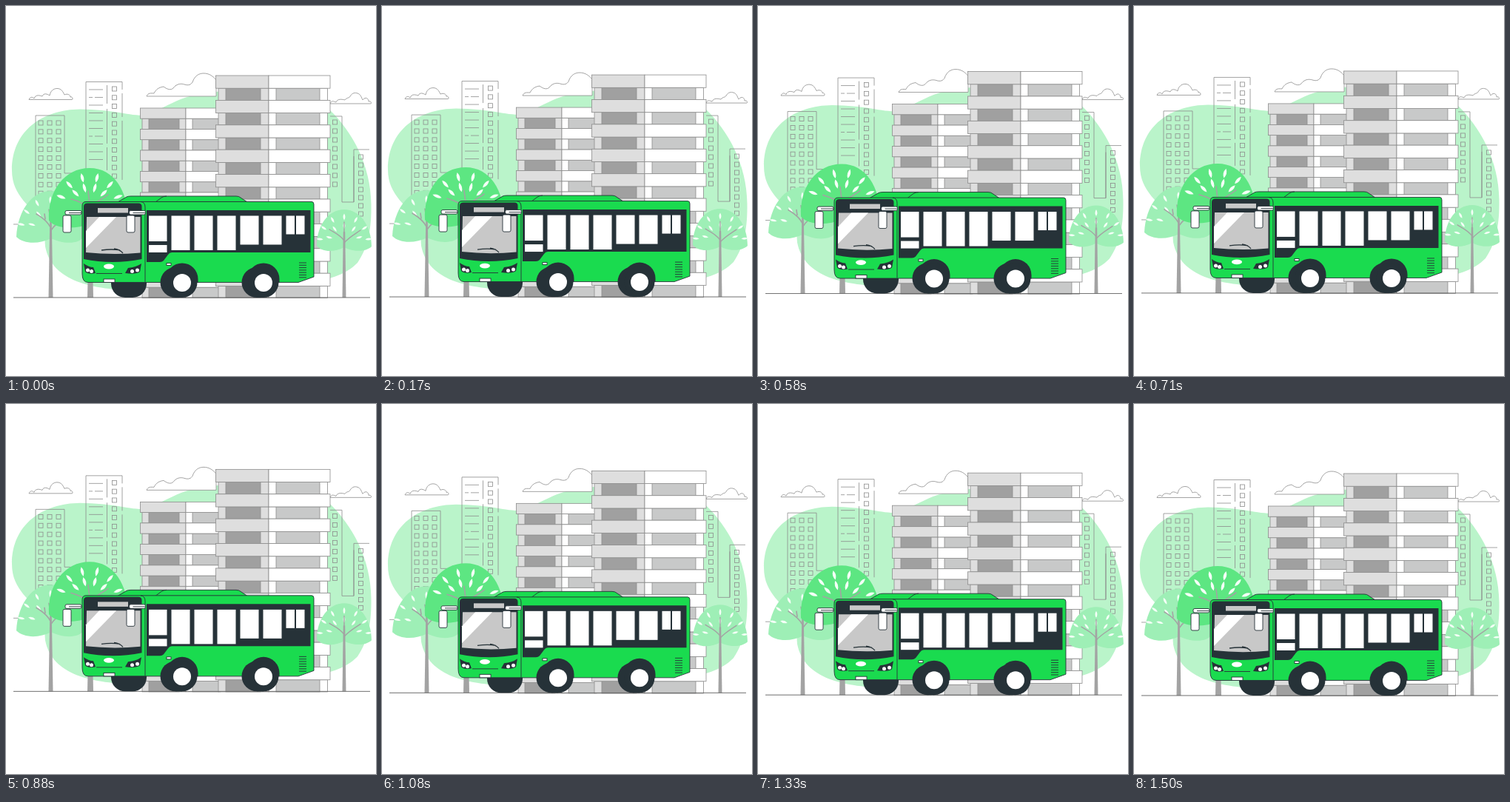
Recreate the animation shown at these times as an HTML page. Size 500x500 px, loop 1.54 s.

```html
<!DOCTYPE html>
<html lang="en">
<head>
<meta charset="utf-8">
<title>City bus</title>
<style>
html, body { margin: 0; width: 100%; height: 100%; overflow: hidden; background: #fff; }
svg { display: block; width: 100%; height: 100%; }
.line { fill: none; stroke: #8c8c8c; stroke-width: .8; }
.cloud { fill: #fff; stroke: #8c8c8c; stroke-width: .8; }
.ink { stroke: #263238; stroke-width: .9; }
.dark { fill: #263238; }
.wood { fill: none; stroke: #a3a3a3; stroke-linecap: round; }
</style>
</head>
<body>
<svg viewBox="0 0 500 500"><g id="scene"></g></svg>
<script>
const GREEN = '#1adb4f', DARK = '#263238', GROUND = 394;
const repeat = (n, draw) => Array.from({ length: n }, (_, i) => draw(i)).join('');
const path = (d, attrs = 'class="line"') => `<path d="${d}" ${attrs}/>`;
const rect = (x, y, w, h, fill, attrs = '') =>
  `<rect x="${x}" y="${y}" width="${w}" height="${h}" fill="${fill}" ${attrs}/>`;
const circle = (x, y, r, fill) => `<circle cx="${x}" cy="${y}" r="${r}" fill="${fill}"/>`;
const outlined = (x, y, w, h, fill) => rect(x, y, w, h, fill, 'stroke="#8c8c8c" stroke-width=".8"');
const squares = (x, y, rows, step) =>
  repeat(rows, i => rect(x, y + i * step, 6, 6, 'none', 'class="line"'));

function skyline() {
  return path('M8 222C8 168 50 140 100 139.5C145 140 160 147 185 148C212 142 232 119 283 116C350 111 405 112 438 141C468 170 493 215 493.5 268C494 300 490 325 475 347C458 364 437 370 400 375C330 385 250 388 180 385C115 383 62 372 53 325C52 312 53 305 50 295C35 270 8 258 8 222Z', 'fill="#baf4ca"')
    + path('M31 126.5C33 122 36 123 38 125C40 119 46 121 49 122C51 117 56 119 59 121C60 115 64 111.5 69 111.5C75 111.5 77 116 79 120C83 118 87 120 87 123C90 122 91 126.5 89 126.5Z', 'class="cloud"')
    + path('M190 122C192 117 196 118 200 118C203 112 207 110 213 109C218 113 223 114 226 111C231 104 238 105 241 106C247 108 250 106 252 103C255 94 261 91 267 91C274 91 279 94 284 100V122Z', 'class="cloud"')
    + path('M438 132C440 127 443 129 446 130C448 125 454 126 458 127C461 123 464 125 465 122C468 117 472 117 475 118C479 119 480 123 482 127C486 122 490 125 490 129C494 128 494 132 493 132Z', 'class="cloud"')
    + path('M40 257V148H79V226H90M10 295H18M108 242V102.5H157V113M157 118V150M157 155V235M136.5 107V132M136.5 139V186M136.5 191V222')
    + repeat(3, i => squares(44 + i * 12, 155, 9, 11.9))
    + repeat(10, i => path(`M112 ${113 + i * 10.5}${i % 5 == 1 ? 'h5m3 0h11' : 'h19'}`))
    + squares(143.5, 109, 11, 11.8)
    + path('M438 149H454V265H470V194H491M470 203V265')
    + squares(441.5, 154, 8, 12) + squares(476.5, 201, 10, 11);
}

// One storey: a slab, then a recessed wall with a shaded and a lit window.
function storey(y, { left, mid, right, slab, gap, inset, shade, lit }) {
  const low = y + slab;
  return outlined(left + inset, low, mid - left - inset, gap, '#dedede')
    + outlined(mid, low, right - mid - inset, gap, '#fff')
    + outlined(shade[0], low, shade[1], gap, '#a0a0a0')
    + outlined(lit[0], low, lit[1], gap, '#c8c9c9')
    + outlined(left, y, mid - left, slab, '#dedede')
    + outlined(mid, y, right - mid, slab, '#fff');
}

function towers() {
  const low = { left: 181.5, mid: 243, right: 290, slab: 14.2, gap: 14.3, inset: 2.5,
    shade: [193, 41], lit: [252, 38] };
  const high = { left: 283.5, mid: 355, right: 438, slab: 17.2, gap: 16.2, inset: 3.5,
    shade: [297, 47], lit: [365, 59] };
  return repeat(9, i => storey(138 + i * 28.5, low))
    + repeat(9, i => storey(94 + i * 33.4, high));
}

// Each ring is [radius, count, spread in degrees].
function leaves(x, y, rings, size) {
  return rings.map(([r, n, spread]) => repeat(n, i => {
    const turn = (i / (n - 1) - .5) * spread;
    return path(`M0 ${-size}Q${size * .65} 0 0 ${size}Q${-size * .65} 0 0 ${-size}`,
      `transform="translate(${x} ${y}) rotate(${turn}) translate(0 ${-r})" fill="#f4fff7"`);
  })).join('');
}

const trunk = (x, top, w) =>
  path(`M${x - 1.2} ${top}h2.4L${x + w / 2} ${GROUND}h${-w}Z`, 'fill="#a3a3a3"');
const branches = (d, width) => path(d, `class="wood" stroke-width="${width}"`);

function trees() {
  return path('M14 312C16 275 36 250 60 250C88 250 105 280 107 310C98 324 75 321 61 314C45 322 24 322 14 312Z', 'fill="#9eefb6"')
    + leaves(60, 302, [[40, 7, 160], [26, 5, 150]], 5)
    + trunk(60.5, 288, 6)
    + branches('M60 299C55 289 47 285 41 281M61 303C68 292 76 289 83 284M60 288L58 275M53 288L52 281', 1.6)
    + path('M58 290C56 250 79 219 113 219C146 219 165 250 165 290C155 302 130 300 113 294C95 302 68 302 58 290Z', 'fill="#5de682"')
    + leaves(113, 272, [[41, 6, 140], [27, 4, 90]], 6.5)
    + trunk(114, 267, 8)
    + branches('M114 276C106 266 95 263 88 261M114 272C122 264 130 261 138 255M113 267L111 250', 1.6)
    + path('M420 324C420 296 436 275 457 275C478 275 494 297 494 325C486 333 467 332 457 326C444 333 427 333 420 324Z', 'fill="#9eefb6"')
    + leaves(457, 318, [[33, 7, 170], [21, 5, 150]], 4.5)
    + trunk(457, 305, 5)
    + branches('M457 317C450 308 443 306 437 302M457 320C464 312 472 308 479 303M457 305V292', 1.4);
}

const wheel = x => path(`M${x - 21.5} 374V369A21.5 21.5 0 0 1 ${x + 21.5} 369V374Z`, 'class="dark"')
  + circle(x - 9, 373.5, 20.5, DARK) + circle(x, 373.5, 20.5, DARK)
  + rect(x - 9, 374, 9, 20, DARK)
  + circle(x, 374, 12, '#fff');

const mirror = (x, arm) => rect(arm, 276.5, 22, 5.5, '#fff', 'rx="2" class="ink"')
  + path(`M${arm + 5} 279.5H${arm + 22}`, 'class="ink"')
  + rect(x, 283, 11, 23, '#fff', 'rx="2" class="ink"');

function bus() {
  const panes = [[193, 24.5, 34.5], [223.5, 25, 46.5], [254.5, 25, 46.5], [285.5, 25, 46.5],
    [316.5, 25, 39], [347.5, 25, 39], [378.5, 11.5, 25], [392, 11.5, 25]];
  const lamps = [[110.5, 357], [115.5, 358.5], [170.5, 358.5], [177.5, 357]];
  return rect(142, 354, 48, 40, DARK, 'rx="19"')
    + path('M151 265L163 258Q165 257 169 257H311Q315 257 317 259L326 265Z', `fill="${GREEN}" class="ink"`)
    + path('M202 265L210 259Q213 257 217 257', 'fill="none" class="ink"')
    + path('M108 264.5H413Q416 264.5 416 268V366L395 373.5H111Q103 373.5 103 362V270Q103 264.5 108 264.5Z', `fill="${GREEN}" class="ink"`)
    + path('M182 264.5Q188 265 188 272V373', 'fill="none" class="ink"')
    // front
    + path('M110 266.5H179Q183.5 266.5 183.5 271V342Q144 350 105 342V271Q105 266.5 110 266.5Z', 'class="dark"')
    + path('M109 285H181.5V333.5Q145 337 108 333Z', 'fill="#c8c8c8"')
    + path('M126 285H149L108 327V304Z', 'fill="#fff"')
    + rect(124, 273, 41, 6.5, '#c8c8c8')
    + path('M129 330Q143 328 154 330M146 328Q154 329 158 334', 'fill="none" class="ink" style="stroke-width:1.3"')
    + '<ellipse cx="139" cy="352" rx="7" ry="3.4" fill="#fff"/>'
    + path('M105 348Q112 353 118 353L121 361Q111 363 107 359ZM183 348Q176 353 165 354L161 361Q176 363 181 359Z', 'class="dark"')
    + lamps.map(([x, y]) => circle(x, y, 2.5, '#fff')).join('')
    + path('M122 361.5H157', 'class="ink"')
    + rect(132, 369, 15, 4.5, '#fff', 'class="ink"')
    // side
    + path('M190 276H411.5V333H224Q221 333 219 336L213 344Q211 346 208 346H190Z', 'class="dark"')
    + panes.map(([x, w, h]) => rect(x, 283.5, w, h, '#fff')).join('')
    + rect(193, 323, 24.5, 10, '#fff')
    + rect(217, 347.5, 6, 3, '#fff', 'class="ink"')
    + repeat(7, i => path(`M396 ${347 + i * 3.3}H406`, 'class="ink"'))
    + wheel(238) + wheel(348)
    + mirror(77, 80) + mirror(163, 166.5);
}

const scene = document.getElementById('scene');
scene.innerHTML = skyline() + towers() + trees()
  + path(`M10 ${GROUND}H492`, 'stroke="#5f5f5f" stroke-width=".9"') + bus();

const LOOP = 1540, LIFT = 6.1, LEAD = 25;
function frame() {
  const phase = (performance.now() + LEAD) % LOOP / LOOP;
  const y = -LIFT * (1 - Math.cos(phase * 2 * Math.PI)) / 2;
  scene.setAttribute('transform', `translate(0 ${y.toFixed(3)})`);
  requestAnimationFrame(frame);
}
frame();
</script>
</body>
</html>
```
